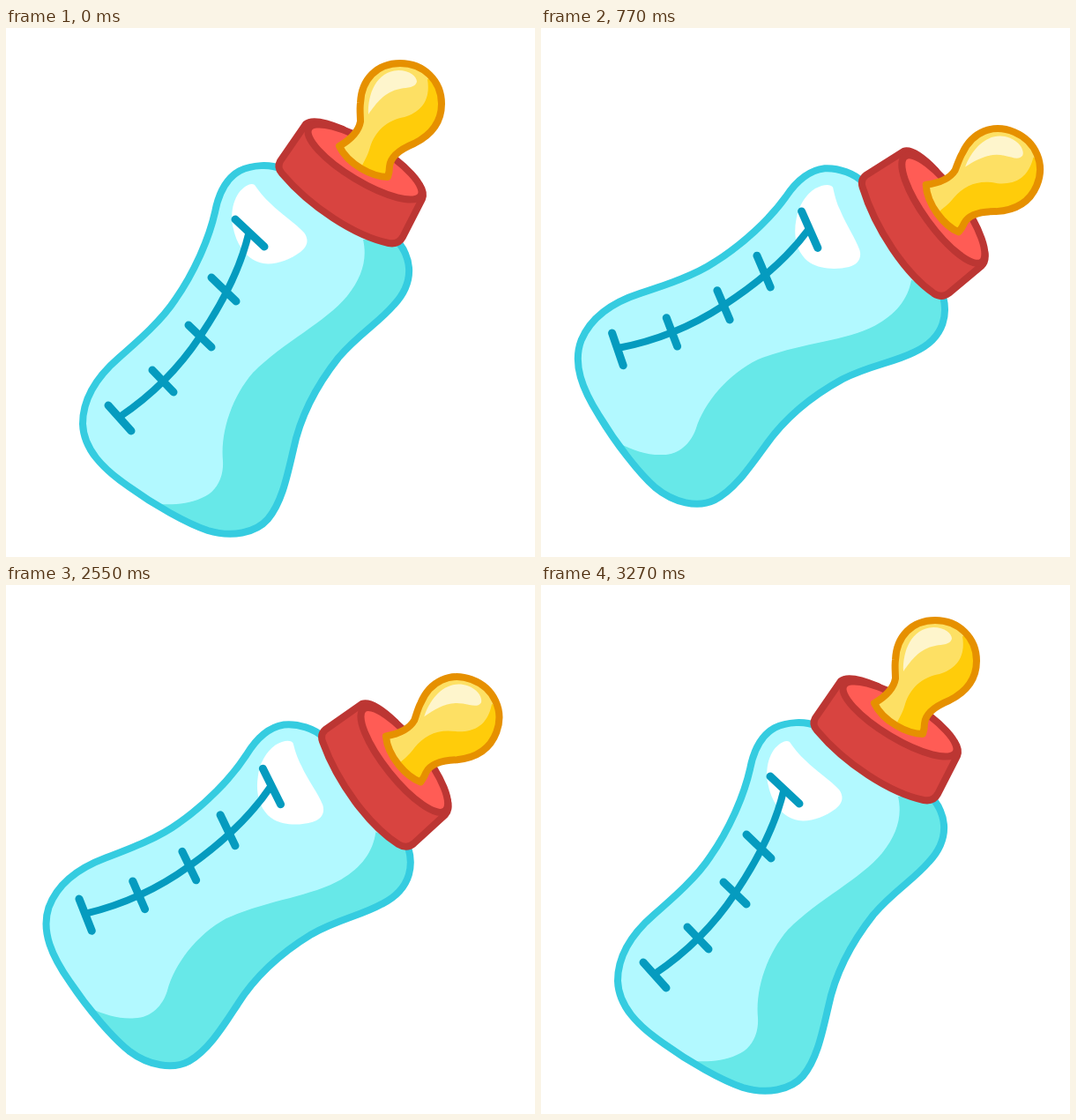
Recreate the animation shown at these times as an HTML page. Size 600x600 px, loop 3310 ms.

```html
<!DOCTYPE html>
<html lang="en">
<head>
<meta charset="utf-8">
<title>Baby bottle</title>
<style>
  html, body { margin: 0; width: 100%; height: 100%; overflow: hidden; background: #fff; }
  svg { display: block; width: 100%; height: 100%; }
  path, ellipse, use { stroke-linecap: round; stroke-linejoin: round; }
  .line { fill: none; stroke-width: 8; }
</style>
</head>
<body>
<svg viewBox="0 0 600 600">
  <defs>
    <path id="body" d="M312 160C300 154 279 155 265 162C249 171 241 188 237 209C230 240 213 278 192 308C177 331 152 353 128 374C106 393 87 418 87 449C88 478 110 500 139 520C168 541 205 562 229 570C256 578 283 573 297 557C313 538 319 508 326 478C333 444 351 407 377 374C400 347 422 335 440 314C453 300 458 286 457 272C456 260 452 252 446 244Z"/>
    <path id="teat" d="M447 40C474 40 494 60 494 86C494 108 481 122 463 131C446 138 436 146 435 157Q435 163 433 169C416 169 388 155 378 134C390 127 400 118 402 106C402 100 401 92 402 85C403 58 421 40 447 40Z"/>
    <clipPath id="inBody"><use href="#body"/></clipPath>
    <clipPath id="inTeat"><use href="#teat"/></clipPath>
  </defs>
  <g id="bottle">
    <use href="#body" fill="#b2f9ff"/>
    <path clip-path="url(#inBody)" fill="#67e8e8" d="M405 240C410 262 404 283 387 304C362 334 315 356 280 391C255 420 243 460 246 491C247 508 240 526 222 533C207 540 190 541 172 540L260 600L500 480V240Z"/>
    <path fill="#fff" d="M264 187C270 180 277 175 282 178C287 185 292 192 300 199C313 212 328 221 338 232C344 240 342 248 334 254C322 263 305 269 292 267C274 264 262 247 258 228C254 213 257 197 264 187Z"/>
    <use href="#body" class="line" stroke="#35cce0"/>
    <g class="line" stroke="#059bbf">
      <path d="M275 234Q262 288 220 350Q184 404 129 441"/>
      <path stroke-width="9" d="M260 217L293 248M233 283L261 310M207 337L233 362M166 388L190 413M116 428L142 457"/>
    </g>
    <g stroke="#bc3633" stroke-width="8">
      <path fill="#d84440" d="M382 115C368 109 348 102 340 109L311 151Q307 158 313 165C345 203 396 236 434 244Q445 246 450 237L472 194Q475 187 469 178Z"/>
      <ellipse fill="#ff5c55" cx="407" cy="152" rx="74" ry="22" transform="rotate(31 407 152)"/>
    </g>
    <use href="#teat" fill="#fde064"/>
    <path clip-path="url(#inTeat)" fill="#ffcc0a" d="M478 58C482 83 470 95 452 101C431 105 419 117 413 135C410 146 406 151 403 158L440 180L500 130V60Z"/>
    <path fill="#fef5cc" d="M411 98C410 75 420 49 445 48C458 48 466 55 466 61C464 68 456 67 447 69C430 72 420 85 411 98Z"/>
    <use href="#teat" class="line" stroke="#e69000"/>
  </g>
</svg>
<script>
  const LOOP = 3310, FPS = 22, TILT = 23;
  const bottle = document.getElementById('bottle');
  const ramp = (x, from, to) => Math.min(1, Math.max(0, (x - from) / (to - from)));
  const start = performance.now();

  // Tip over, rest, tip back, in steps of one film frame.
  function draw() {
    const t = (performance.now() - start) % LOOP;
    const step = Math.floor((t + 5) * FPS / 1000);
    const angle = TILT * (ramp(step, 0.2, 13.8) - ramp(step, 54.4, 68.3));
    bottle.setAttribute('transform', `rotate(${angle} 300 300)`);
    requestAnimationFrame(draw);
  }
  draw();
</script>
</body>
</html>
```
